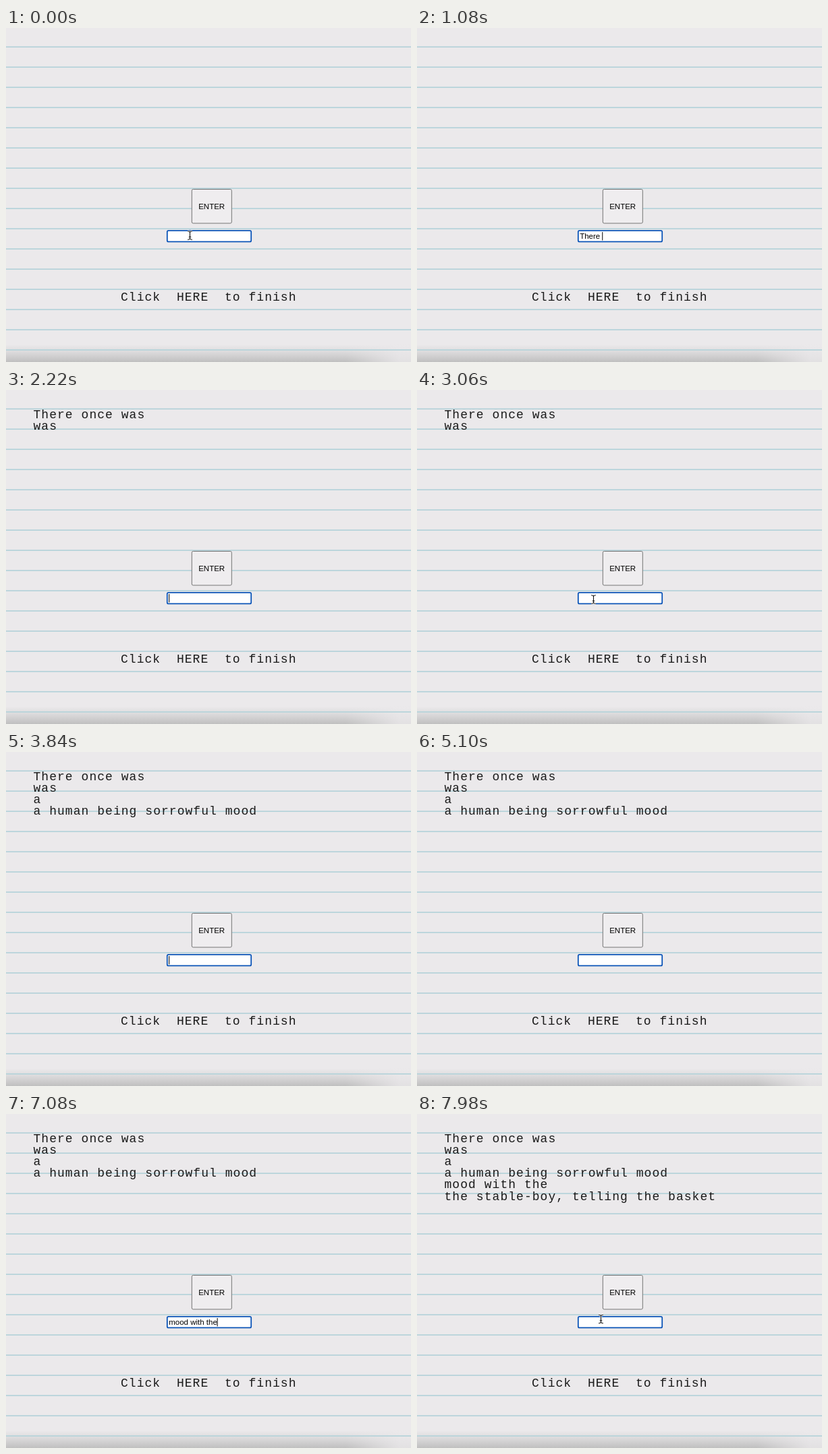
Write an HTML page that moves like this. It is 600 by 496 pixels and loops after 8 s.

```html
<!DOCTYPE html>
<html lang="en">
<head>
<meta charset="utf-8">
<title>Shared story</title>
<style>
  html, body { margin: 0; width: 100%; height: 100%; overflow: hidden; background: #ebe9eb; }
  svg { display: block; width: 600px; height: 496px; }
  text { white-space: pre; }
  .story { font: 18px "Liberation Mono", "Courier New", monospace; letter-spacing: 1.04px; fill: #1a1a1a; }
  .ui { font: 11.5px "Liberation Sans", Arial, sans-serif; fill: #000; }
</style>
</head>
<body>
<svg viewBox="0 0 600 496" xmlns="http://www.w3.org/2000/svg">
  <defs>
    <linearGradient id="shade" x2="0" y2="1">
      <stop offset="0" stop-color="#bcbcbc" stop-opacity="0"/>
      <stop offset=".4" stop-color="#bcbcbc" stop-opacity=".3"/>
      <stop offset="1" stop-color="#b8b8b8" stop-opacity=".85"/>
    </linearGradient>
    <linearGradient id="fade">
      <stop offset=".84" stop-color="#ebe9eb" stop-opacity="0"/>
      <stop offset=".97" stop-color="#ebe9eb" stop-opacity=".8"/>
    </linearGradient>
  </defs>
  <rect width="600" height="496" fill="#ebe9eb"/>
  <rect y="470" width="600" height="26" fill="url(#shade)"/>
  <rect y="470" width="600" height="26" fill="url(#fade)"/>
  <path id="rules" stroke="#b6d3da" stroke-width="1.7"/>
  <g id="lines" class="story"></g>
  <text class="story" x="170" y="405">Click  HERE  to finish</text>
  <rect x="275.3" y="239.5" width="59" height="50.5" rx="2" fill="#efedef" stroke="#747474"/>
  <text class="ui" x="304.7" y="268.8" text-anchor="middle">ENTER</text>
  <rect x="238.8" y="300.8" width="124.4" height="16.6" rx="2" fill="#fff" stroke="#0c55b8" stroke-width="1.8"/>
  <text id="field" class="ui" x="241.2" y="313"></text>
  <rect id="caret" y="303" width="1" height="12.4" fill="#000"/>
  <g id="mouse" fill="none">
    <path id="halo" stroke="#fff" stroke-width="2.6"/>
    <path id="beam" stroke="#111" stroke-width="1.1"/>
  </g>
</svg>
<script>
const LOOP = 8000, BLINK = 300, LEFT = 241.2;
const $ = id => document.getElementById(id);

// Each turn: typed text, key times, time of Enter, and the reply
const turns = [
  { text: "There once was", reply: "was", enter: 2220,
    keys: [420, 540, 600, 660, 960, 1080, 1380, 1440, 1560, 1620, 1740, 1800, 1920, 1980] },
  { text: "a", reply: "a human being sorrowful mood", enter: 3840, keys: [3600] },
  { text: "mood with the", reply: "the stable-boy, telling the basket", enter: 7200,
    keys: [5520, 5640, 5700, 5820, 5940, 6060, 6180, 6300, 6360, 6600, 6720, 6840, 6960] }
];
const allKeys = turns.flatMap(turn => turn.keys);

// Pointer visits as [time, x, y]; typing hides the pointer
const visits = [
  [[0, 272.5, 308], [420, 272.5, 308]],
  [[2940, 269, 308], [3060, 261.5, 311], [3600, 261.5, 311]],
  [[7620, 266, 311], [7980, 272.5, 304.5], [8000, 272.5, 304.5]]
];

let rules = "";
for (let y = 28.2; y < 496; y += 30) rules += `M0 ${y}H600`;
$("rules").setAttribute("d", rules);

const beam = "M-3.5 -6.2Q-.5 -6.2 0 -4.6Q.5 -6.2 3.5 -6.2M0 -5V5M-3.5 6.2Q-.5 6.2 0 4.6Q.5 6.2 3.5 6.2M-1.8 2.2H1.8";
$("halo").setAttribute("d", beam);
$("beam").setAttribute("d", beam);

const rows = turns.flatMap(({ text, reply, enter }) => [text, reply].map(s => ({ s, enter })));
rows.forEach((row, i) => {
  row.node = document.createElementNS("http://www.w3.org/2000/svg", "text");
  row.node.setAttribute("x", 40.5);
  row.node.setAttribute("y", 42 + 17.1 * i);
  row.node.textContent = row.s;
  $("lines").append(row.node);
});

const show = (node, on) => node.setAttribute("visibility", on ? "visible" : "hidden");

function pointerAt(t) {
  const path = visits.find(v => t >= v[0][0] && t < v[v.length - 1][0]);
  if (!path) return null;
  const i = path.findIndex(p => p[0] > t);
  const [t0, x0, y0] = path[i - 1], [t1, x1, y1] = path[i];
  const k = (t - t0) / (t1 - t0);
  return [x0 + (x1 - x0) * k, y0 + (y1 - y0) * k];
}

function draw(t) {
  rows.forEach(row => show(row.node, t >= row.enter));

  const turn = turns.find(u => t < u.enter);
  const typed = turn ? turn.text.slice(0, turn.keys.filter(k => k <= t).length) : "";
  $("field").textContent = typed;

  const lastKey = allKeys.filter(k => k <= t).pop() ?? 240;
  $("caret").setAttribute("x", LEFT + (typed ? $("field").getComputedTextLength() - .2 : 0));
  show($("caret"), t >= lastKey && Math.floor((t - lastKey) / BLINK) % 2 === 0);

  const pos = pointerAt(t);
  show($("mouse"), pos);
  if (pos) $("mouse").setAttribute("transform", `translate(${pos})`);
}

const start = performance.now();
function tick() {
  draw((performance.now() - start) % LOOP);
  requestAnimationFrame(tick);
}
tick();
</script>
</body>
</html>
```
